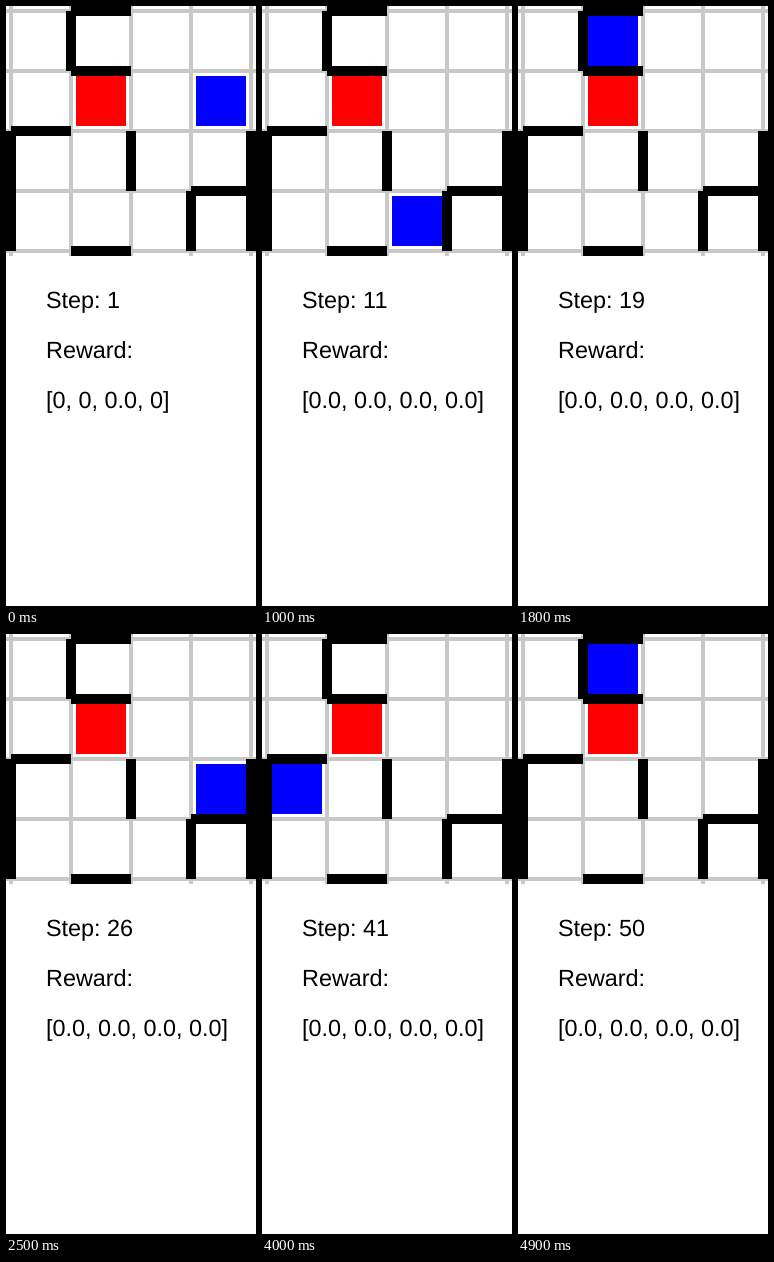
Recreate the animation shown at these times as an HTML page. Size 250x600 px, loop 5 s.

```html
<!DOCTYPE html>
<html lang="en">
<head>
<meta charset="utf-8">
<title>Grid walk</title>
<style>
  html, body { margin: 0; width: 100%; height: 100%; overflow: hidden; background: #fff; }
  svg { display: block; }
  text { font: 23.4px "Liberation Sans", Arial, sans-serif; text-rendering: geometricPrecision; }
</style>
</head>
<body>
<svg width="250" height="600" viewBox="0 0 250 600">
  <path id="grid" stroke="#c8c8c8" stroke-width="4"/>
  <rect x="70" y="70" width="50" height="50" fill="#f00"/>
  <rect id="agent" width="50" height="50" fill="#00f"/>
  <path id="walls" stroke="#000" stroke-width="10"/>
  <text id="step" x="40" y="302"></text>
  <text x="40" y="352">Reward:</text>
  <text id="reward" x="40" y="402"></text>
</svg>
<script>
  const $ = id => document.getElementById(id);
  const CELL = 60, SIZE = 4, STEP_MS = 100;
  const edge = i => 5 + i * CELL;

  let lines = '';
  for (let i = 0; i <= SIZE; i++) lines += `M${edge(i)} 0V250M0 ${edge(i)}H250`;
  $('grid').setAttribute('d', lines);

  // Walls start at a grid corner [column, row] and span one or two cells.
  const across = [[1, 0], [1, 1], [0, 2], [3, 3], [1, 4]];
  const down = [[1, 0, 1], [2, 2, 1], [3, 3, 1], [0, 2, 2], [4, 2, 2]];
  $('walls').setAttribute('d',
    across.map(([c, r]) => `M${edge(c)} ${edge(r)}h${CELL}`).join('') +
    down.map(([c, r, n]) => `M${edge(c)} ${edge(r)}v${n * CELL}`).join(''));

  // The board wraps at its borders; a dot means the agent stays put.
  const moves = '.D.L.ULDDR' + '.U.D.DL.' + '.R.RD.D' + 'UU.D..LD' + 'ULLUU.U' + 'DDL.L.L..';
  const dirs = { '.': [0, 0], U: [0, -1], D: [0, 1], L: [-1, 0], R: [1, 0] };
  const wrap = v => (v + SIZE) % SIZE;
  const route = [[3, 1]];
  for (const m of moves) {
    const [c, r] = route[route.length - 1];
    route.push([wrap(c + dirs[m][0]), wrap(r + dirs[m][1])]);
  }

  function draw(ms) {
    const i = Math.floor(ms / STEP_MS) % route.length;
    const [c, r] = route[i];
    $('agent').setAttribute('x', edge(c) + 5);
    $('agent').setAttribute('y', edge(r) + 5);
    $('step').textContent = `Step: ${i + 1}`;
    $('reward').textContent = i ? '[0.0, 0.0, 0.0, 0.0]' : '[0, 0, 0.0, 0]';
  }

  const start = performance.now();
  function tick() {
    draw(performance.now() - start);
    requestAnimationFrame(tick);
  }
  tick();
</script>
</body>
</html>
```
